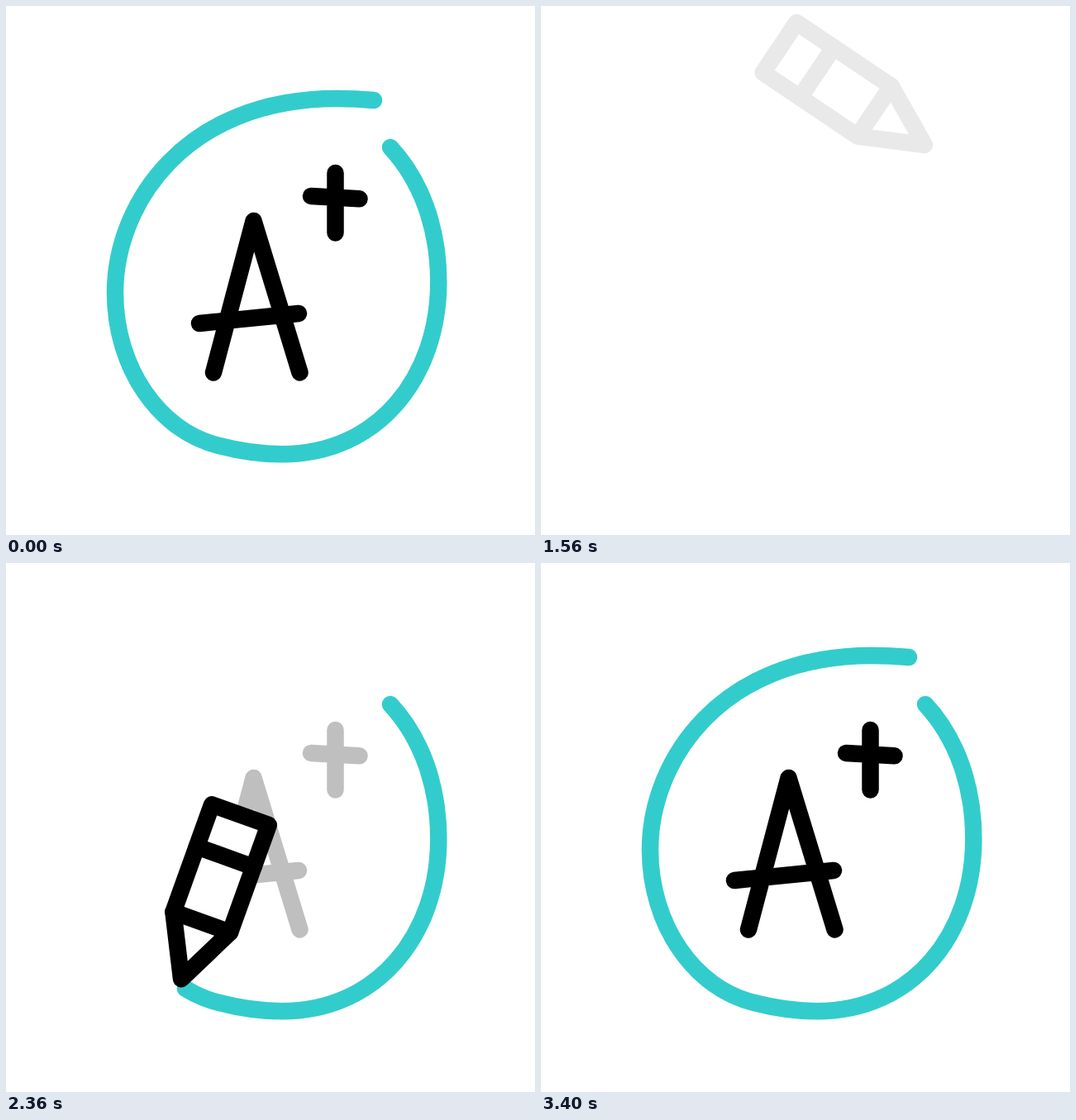
Animation, 640 px wide and 640 px high, one loop 3.62 s. Source, as an HTML page:

```html
<!DOCTYPE html>
<html lang="en">
<head>
<meta charset="utf-8">
<title>Top grade</title>
<style>
  html, body { margin: 0; width: 100%; height: 100%; overflow: hidden; background: #fff; }
  svg { display: block; width: 100%; height: 100%; }
  path { fill: none; stroke: #000; stroke-width: 20.5; stroke-linecap: round; stroke-linejoin: round; }
  #ring { stroke: #33cccc; }
  #track { stroke: none; }
  #pencil .body { fill: #fff; }
</style>
</head>
<body>
<svg viewBox="0 0 640 640">
  <path id="grade" d="M251 443.5 299.5 260 355.5 443.5M234 384 354 372M398.5 202V274.5M369 230 427.5 233.3"/>
  <path id="ring" d="M465 171C502 211 523.3 268 523.3 334C523.3 449 450 542.3 334 542.3C311 542.3 285 539 258 532C186 515 132 438 132 347C132 240 216 112 400 112C415 112 430 112.6 445 114"/>
  <path id="track" d="M464 168C496 208 517 262 517 328C517 440 446 533 332 533C309 533 283 530 257 523C188 507 135 434 135 345C135 238 216 112 400 109L411 109.5"/>
  <g id="pencil">
    <path class="body" d="M0 0-36.5-73V-211H36.5V-73Z"/>
    <path d="M-36.5-73H36.5M-36.5-157H36.5"/>
  </g>
</svg>
<script>
const LOOP = 3620;
const [grade, ring, track, pencil] =
  ['grade', 'ring', 'track', 'pencil'].map(id => document.getElementById(id));
const ringLength = ring.getTotalLength();
const trackLength = track.getTotalLength();

// Pencil tilt in degrees at given times
const tilts = [[1855, -56.1], [2020, -31.7], [2360, 19.6], [2680, 71.5], [2705, 75]];

const ramp = (t, from, to) => Math.min(1, Math.max(0, (t - from) / (to - from)));

// Cubic bezier (a, 0, b, 1), solved by bisection
function ease(x, a, b) {
  if (x <= 0 || x >= 1) return x;
  let lo = 0, hi = 1, u = 0.5;
  for (let i = 0; i < 24; i++) {
    const v = 1 - u;
    if (3 * a * u * v * v + 3 * b * u * u * v + u * u * u < x) lo = u; else hi = u;
    u = (lo + hi) / 2;
  }
  return u * u * (3 - 2 * u);
}

function tiltAt(t) {
  let angle = tilts[0][1];
  for (let i = 1; i < tilts.length; i++) {
    const [t0, a0] = tilts[i - 1], [t1, a1] = tilts[i];
    angle += (a1 - a0) * ramp(t, t0, t1);
  }
  return angle;
}

function showRing(from, to) {
  const length = (to - from) * ringLength;
  ring.style.display = length > 0 ? '' : 'none';
  ring.style.strokeDasharray = `${length} ${2 * ringLength}`;
  ring.style.strokeDashoffset = -from * ringLength;
}

function draw(t) {
  if (t < 1500) showRing(ease(ramp(t, 200, 1240), 0.42, 0.58), 1);
  else showRing(0, ramp(t, 2028, 2708));

  grade.style.opacity = 1 - ramp(t, 510, 1210) + ramp(t, 2186, 2882);

  const progress = ease(ramp(t, 1807, 2844), 0.42, 0.66);
  const tip = track.getPointAtLength(progress * trackLength);
  pencil.setAttribute('transform', `translate(${tip.x} ${tip.y}) rotate(${tiltAt(t)})`);
  pencil.style.opacity = ramp(t, 1540, 1800) - ramp(t, 3120, 3400);
}

function tick() {
  draw(performance.now() % LOOP);
  requestAnimationFrame(tick);
}
tick();
</script>
</body>
</html>
```
